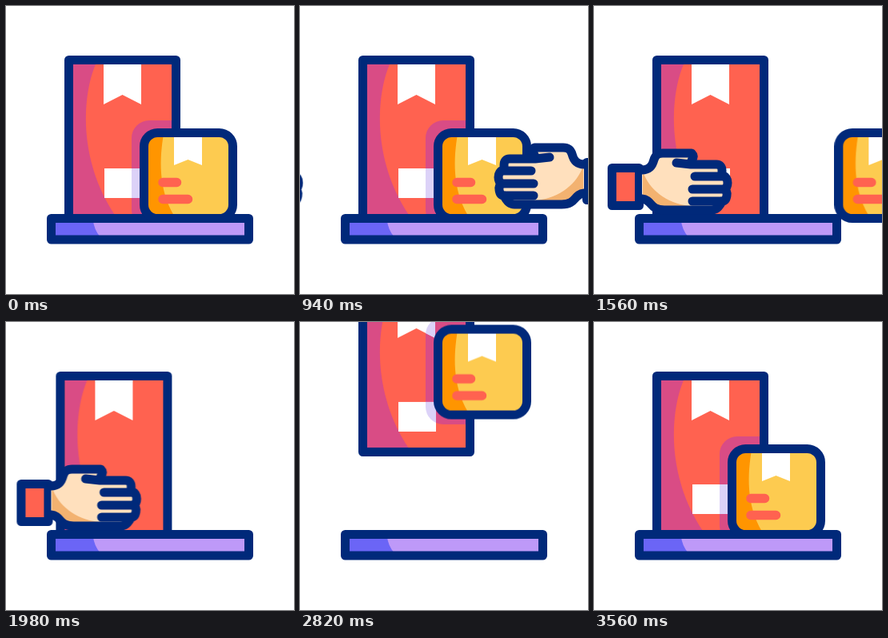
An HTML page without scripts for the animation above (3600 ms loop, 360 px wide and 360 px high).

```html
<!DOCTYPE html>
<html lang="en">
<head>
<meta charset="utf-8">
<title>Parcels</title>
<style>
html, body { margin: 0; width: 100%; height: 100%; overflow: hidden; background: #fff; }
svg { display: block; width: 100%; height: 100%; }
.line { fill: none; stroke: #00297a; stroke-width: 11; stroke-linecap: round; stroke-linejoin: round; }
.red { fill: #ff6250; }
.pink { fill: #d94c85; }
.dash { fill: none; stroke: #ffcb50; stroke-width: 11.5; stroke-linecap: round; }
.tall, .small, .shade, .left, .right, .dash { animation: 3.6s linear infinite; }
.tall { animation-name: tall; }
.small { animation-name: small; }
.shade { animation-name: shade; }
.left { animation-name: left; }
.right { animation-name: right; }
.trail { animation-name: trail; }
.drop { animation-name: drop; }
.puff { animation-name: puff; }
.late { animation-delay: -3.5s; }

@keyframes tall {
  0%, 54.44% { transform: translate(0, 0); }
  69.04% { transform: translate(-263px, 0); }
  69.05% { transform: translate(0, -270px); }
  84.11%, 100% { transform: translate(0, 0); }
}
@keyframes small {
  0%, 32.86% { transform: translate(0, 0); }
  48.61%, 71.43% { transform: translate(200px, 0); }
  71.44% { transform: translate(0, -274px); }
  86.67%, 100% { transform: translate(0, 0); }
}
/* relative to the tall box */
@keyframes shade {
  0%, 32.86% { transform: translate(0, 0); }
  48.61%, 69.04% { transform: translate(200px, 0); }
  69.05%, 84.11% { transform: translate(0, -46px); }
  86.67%, 100% { transform: translate(0, 0); }
}
@keyframes left {
  0%, 25.56% { transform: translateX(-175px); }
  36.67%, 45.56% { transform: translateX(3px); }
  48.33%, 54.44% { transform: translateX(10px); }
  69.44%, 100% { transform: translateX(-260px); }
}
@keyframes right {
  0%, 15.83% { transform: translateX(118px); }
  25.83%, 32.86% { transform: translateX(0); }
  48.61%, 100% { transform: translateX(200px); }
}
@keyframes trail {
  0%, 63.89% { stroke-dashoffset: 19; }
  67.78% { stroke-dashoffset: -53; }
  69.44%, 100% { stroke-dashoffset: -84; }
}
@keyframes drop {
  0%, 82% { stroke-dashoffset: 35; }
  83.89% { stroke-dashoffset: 0; }
  87.3%, 100% { stroke-dashoffset: -61; }
}
@keyframes puff {
  0%, 82.9% { stroke-dashoffset: 8; }
  83.89% { stroke-dashoffset: 0; }
  86.9%, 100% { stroke-dashoffset: -23; }
}
</style>
</head>
<body>
<svg viewBox="0 0 360 360">
  <defs>
    <path id="labels" d="M122 73H169V123L145.5 111 122 123ZM123 203H170V240H123Z"/>
    <rect id="cast" x="157" y="143" width="142" height="134" rx="22"/>
    <clipPath id="inside"><path d="M84 73H208V261H84Z"/></clipPath>
    <clipPath id="onLabels"><use href="#labels"/></clipPath>

    <g id="hand">
      <rect class="line" style="fill:#ff6250" x="19.5" y="202.5" width="34" height="47"/>
      <path fill="#ffe0bd" d="M57 205C66 205 70 200 72 192C74 186 77 184 83 184H119L118 198H150Q157 198 157 206V211Q164 214 164 221Q164 227 160 229Q164 232 163 237Q162 244 157 244Q152 255 144 255H85C66 255 70 242 57 241Z"/>
      <path fill="#f3b270" d="M58 207C66 229 86 246 116 250L112 255H82L58 241Z"/>
      <g class="line">
        <path d="M57 205C66 205 70 200 72 192C74 186 77 184 83 184H119Q123 188 119 193"/>
        <path d="M100 196L118 198H150Q157 198 157 206V211Q164 214 164 221Q164 227 160 229Q164 232 163 237Q162 244 157 244Q152 255 144 255H85C66 255 70 242 57 241"/>
        <path d="M123 213H158M120 229H161M120 244H157"/>
      </g>
    </g>
  </defs>

  <rect width="360" height="360" fill="#fff"/>

  <path class="dash trail" stroke-dasharray="18 200" d="M260 141H177"/>
  <path class="dash trail" stroke-dasharray="2 200" d="M262 170H179"/>
  <path class="dash drop" stroke-dasharray="34 200" d="M233.5 44v60"/>
  <path class="dash drop" stroke-dasharray="3 200" d="M262.5 63.5v60"/>
  <path class="dash puff" stroke-dasharray="7 200" d="M59.5 254.5h-21"/>
  <path class="dash puff" stroke-dasharray="1 200" d="M64 229.5l-14 -14"/>
  <path class="dash puff late" stroke-dasharray="7 200" d="M297.5 254.5h21"/>
  <path class="dash puff late" stroke-dasharray="1 200" d="M296 229.5l14 -14"/>

  <g class="tall">
    <path class="red" d="M79 68H212V265H79Z"/>
    <path class="pink" d="M84 73H112C96 110 89 190 136 261H84Z"/>
    <g clip-path="url(#inside)"><use class="shade pink" href="#cast"/></g>
    <use href="#labels" fill="#fff"/>
    <g clip-path="url(#onLabels)"><use class="shade" href="#cast" fill="#dcd2f8"/></g>
    <rect class="line" x="78.5" y="67.5" width="134" height="198"/>
  </g>

  <path fill="#be99f8" d="M57 266H303V292H57Z"/>
  <path fill="#6b65f6" d="M57 266H108.500Q110 280 118 289V292H57Z"/>
  <rect class="line" x="56.5" y="265.500" width="247" height="26.500"/>

  <g class="small">
    <rect x="172.500" y="158.500" width="111" height="107" rx="17" fill="#fdcb50"/>
    <path fill="#ff9500" d="M190 160H197C192 190 190 228 210 262H190Q175 262 175 247V175Q175 160 190 160Z"/>
    <path fill="#fff" d="M210 162H245V199L227.500 192 210 199Z"/>
    <path d="M196 220.500H213.500M196 241.500H227.500" stroke="#ff6250" stroke-width="11.500" stroke-linecap="round"/>
    <rect class="line" x="172.500" y="158.500" width="111" height="107" rx="17"/>
  </g>

  <g class="left"><use href="#hand"/></g>
  <g class="right"><use href="#hand" transform="matrix(-1 0 0 1 412 -7)"/></g>
</svg>
</body>
</html>
```
